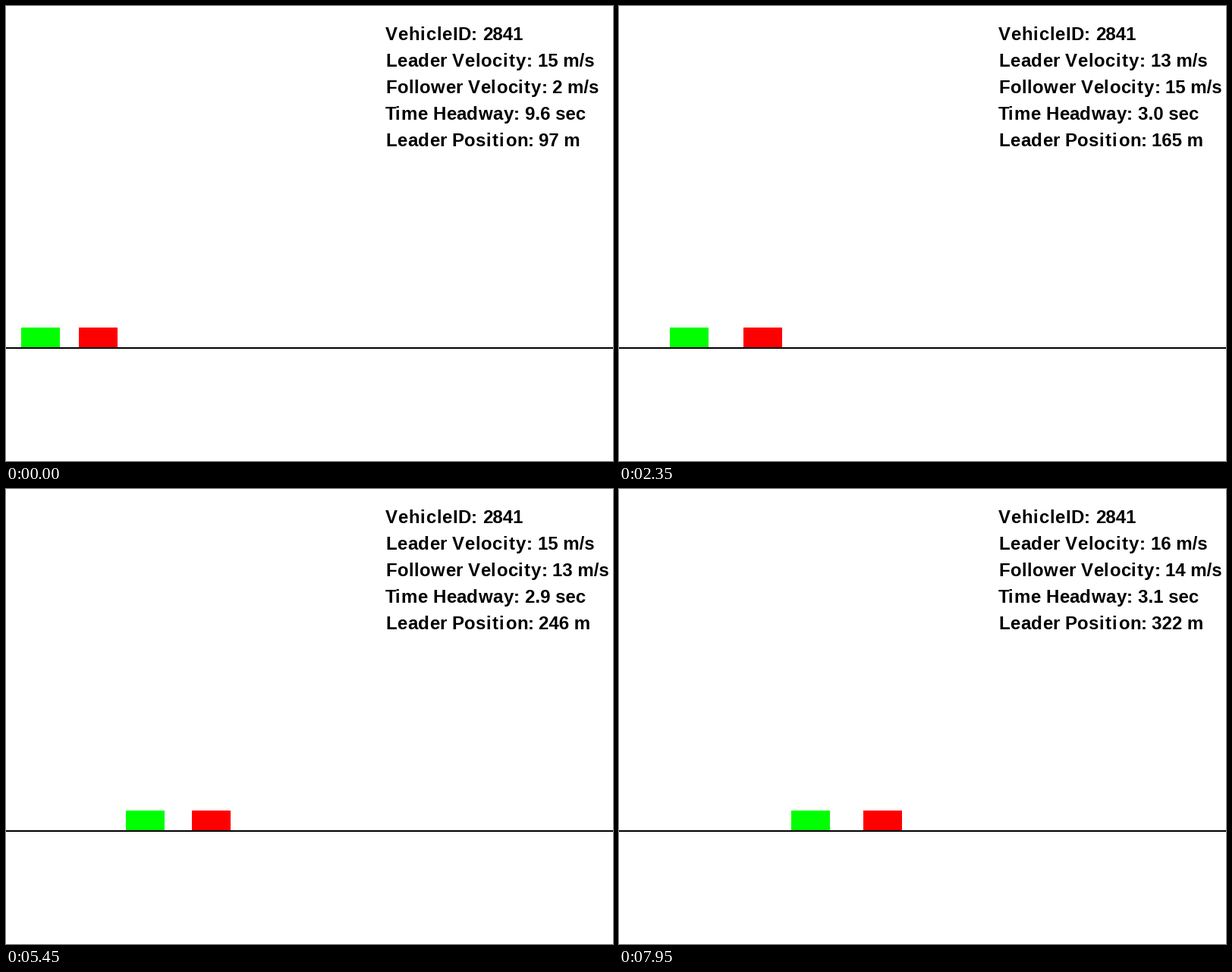
Recreate the animation shown at these times as a matplotlib script. Size 800 by 600 pixels, loop 8000 ms.

```python
import numpy as np
import matplotlib.pyplot as plt
from matplotlib.animation import FuncAnimation
from matplotlib.patches import Rectangle
from matplotlib.textpath import TextPath

W, H, DPI = 800, 600, 100
FRAMES, INTERVAL = 160, 50
STEP = 0.1               # simulated seconds per frame
CAR_W, CAR_H, ROAD_Y = 51, 26, 450
CAR_LENGTH = 51.9        # taken off the distance to get the net gap
SIZE = 24                # text height in pixels
FONT = dict(family="Liberation Sans", weight="bold")


def travel(start, speed):
    """Positions reached by driving at the given speeds."""
    steps = (speed[1:] + speed[:-1]) / 2 * STEP
    return start + np.concatenate([[0], np.cumsum(steps)])


time = np.arange(FRAMES) * STEP

# The leader cruises and slows down once, in a bell-shaped dip
lead_v = 15.51 - 3.19 * np.exp(-((time - 6.7) / 2.65) ** 2 / 2)
lead_x = travel(96.7, lead_v)

# The follower accelerates evenly between a few turning points
turns = [0, 1.2, 2, 3.2, 4, 6.3, 8, 9.2, 11, 12.2, 14, 15.9]
speeds = [2.49, 6, 10, 11.8, 15.5, 15, 16.7, 13, 12.5, 13.95, 14.4, 13.8]
tail_v = np.interp(time, turns, speeds)
tail_x = travel(20.97, tail_v)

headway = (lead_x - tail_x - CAR_LENGTH) / tail_v

fig = plt.figure(figsize=(W / DPI, H / DPI), dpi=DPI, facecolor="white")
ax = fig.add_axes([0, 0, 1, 1])
ax.set_xlim(0, W)
ax.set_ylim(H, 0)
ax.axis("off")


def box(x, y, w, h, color):
    return ax.add_patch(Rectangle((x, y), w, h, facecolor=color,
                                  edgecolor="none", antialiased=False))


def write(x, y, text=""):
    return ax.text(x, y, text, color="black", fontsize=SIZE * 72 / DPI,
                   ha="left", va="baseline", **FONT)


def right_edge(text):
    return TextPath((0, 0), text, size=SIZE, prop=FONT).get_extents().x1


def advance(char):
    return right_edge(char + "I") - right_edge("I")


def label(x, y, word):
    """Write a word letter by letter with loose tracking."""
    extra = {"i": 1.4, "t": 1.4, "T": -2.5}
    for char in word:
        write(x, y, char)
        x += advance(char) + extra.get(char, 0.45)


# Each line: words with their x, then the x of the value
LINES = [
    ([("VehicleID:", 500)], 628),
    ([("Leader", 500), ("Velocity:", 588)], 701),
    ([("Follower", 500), ("Velocity:", 608.5)], 720.5),
    ([("Time", 500), ("Headway:", 562)], 683.5),
    ([("Leader", 500), ("Position:", 587)], 701.5),
]
values = []
for row, (words, value_x) in enumerate(LINES):
    baseline = 45 + 35 * row
    for word, x in words:
        label(x, baseline, word)
    values.append(write(value_x, baseline))

box(0, ROAD_Y, W, 2, "black")
green = box(0, ROAD_Y - CAR_H, CAR_W, CAR_H, "#00ff00")
red = box(0, ROAD_Y - CAR_H, CAR_W, CAR_H, "#ff0000")


def update(i):
    red.set_x(int(lead_x[i]))
    green.set_x(int(tail_x[i]))
    texts = ("2841", f"{lead_v[i]:.0f} m/s", f"{tail_v[i]:.0f} m/s",
             f"{headway[i]:.1f} sec", f"{lead_x[i]:.0f} m")
    for item, text in zip(values, texts):
        item.set_text(text)
    return [red, green, *values]


anim = FuncAnimation(fig, update, frames=FRAMES, interval=INTERVAL,
                     repeat=True, repeat_delay=0, blit=False)
plt.show()
```
